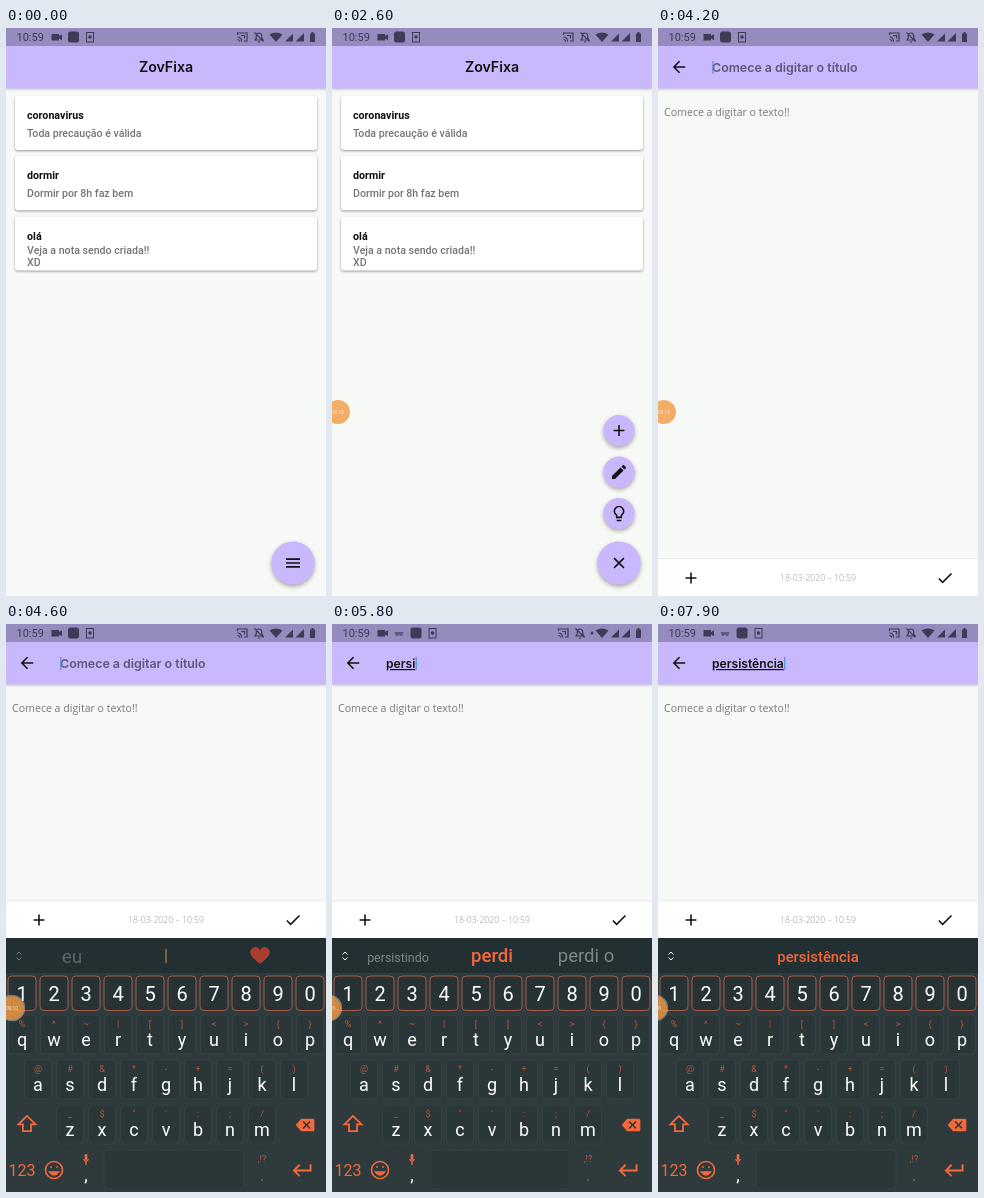
An HTML page that plays this animation: 320 px wide and 568 px high, repeating every 8000 ms.

```html
<!DOCTYPE html>
<html lang="pt">
<head>
<meta charset="utf-8">
<title>Notas</title>
<style>
html, body { margin: 0; height: 100%; overflow: hidden; background: #f7f9f7 }
svg { display: block; width: 100vw; height: 100vh; font-family: Roboto, sans-serif }
.card { fill: #fff; filter: drop-shadow(0 1px 1px #0006) }
.fab { filter: drop-shadow(0 2px 2px #0005) }
.bar { filter: drop-shadow(0 1px 1px #0003) }
.line { fill: none; stroke: currentColor; stroke-width: 2 }
.brand { font-family: Inter, sans-serif; font-weight: 600 }
.open { font-family: "Open Sans", sans-serif }
</style>
</head>
<body>
<svg id="stage" viewBox="0 0 320 568" preserveAspectRatio="none"></svg>
<script>
const LOOP = 8000, LILAC = '#c9b8fc', BG = '#f7f9f7', ORANGE = '#f4683c';
const $ = id => document.getElementById(id);

const text = (x, y, size, str, fill, more = '') =>
  `<text x="${x}" y="${y}" font-size="${size}" fill="${fill}" ${more}>${str}</text>`;
const mid = (x, y, size, str, fill, more = '') =>
  text(x, y, size, str, fill, 'text-anchor="middle" ' + more);
const rect = (x, y, w, h, fill, more = '') =>
  `<rect x="${x}" y="${y}" width="${w}" height="${h}" fill="${fill}" ${more}/>`;
const group = (id, body, more = '') => `<g id="${id}" ${more}>${body}</g>`;

// Icons live on a 24 unit grid
const ICONS = {
  menu: 'M3 7h18M3 12h18M3 17h18',
  close: 'M5.7 5.7l12.6 12.6M18.3 5.7L5.7 18.3',
  add: 'M5 12h14M12 5v14',
  back: 'M20 12H5.5M12.7 4.7L5.4 12l7.3 7.3',
  check: 'M4.1 12.7L9 17.6 20.3 6.3',
  bulb: 'M9 17v-2.8a6 6 0 1 1 6 0V17zM9 21h6',
  shift: 'M12 3L2.5 12.5H7.500V20h9v-7.500h5z',
  enter: 'M21 6v6.500H4M9.500 6.500L3.500 12.500l6 6',
  updown: 'M7 9l5-5 5 5M7 15l5 5 5-5',
  edit: 'M3 17.25V21h3.75L17.81 9.94l-3.75-3.75zM20.71 7.04c.39-.39.39-1.02 0-1.41l-2.34-2.34c-.39-.39-1.02-.39-1.41 0l-1.83 1.83 3.75 3.75z',
  erase: 'M22 4H7L0 12l7 8h15q2 0 2-2V6q0-2-2-2zM19 15.600L17.600 17 14 13.400 10.400 17 9 15.600 12.600 12 9 8.400 10.400 7 14 10.600 17.600 7 19 8.400 15.400 12z',
  heart: 'M12 21C3 14 1 11 1 7.500a5.700 5.700 0 0 1 11-2 5.700 5.700 0 0 1 11 2C23 11 21 14 12 21z',
};
const SOLID = ['edit', 'erase', 'heart'];
const icon = (name, x, y, color = '#111', k = .78) =>
  `<path d="${ICONS[name]}" transform="translate(${x} ${y}) scale(${k}) translate(-12 -12)" color="${color}" ` +
  (SOLID.includes(name) ? `fill="${color}"/>` : 'class="line"/>');

const appBar = body => `<rect class="bar" y="-10" width="320" height="70.500" fill="${LILAC}"/>` + body;

// Note list
const notes = [
  [68, 'coronavirus', ['Toda precaução é válida']],
  [128.2, 'dormir', ['Dormir por 8h faz bem']],
  [188.600, 'olá', ['Veja a nota sendo criada!!', 'XD']],
];
const card = ([y, title, lines]) =>
  `<rect class="card" x="9" y="${y}" width="302" height="54" rx="3"/>` +
  text(21, y + 23, 10.700, title, '#111', 'font-weight="600"') +
  lines.map((s, i) => text(21, y + 41 + (lines.length > 1 ? -4 + 12 * i : 0) + (lines.length > 1 ? 0 : 0), 10.600, s, '#757575', 'font-weight="500"')).join('');

const dial = ['add', 'edit', 'bulb'];
const dialY = [402.500, 444, 485.500];
const home = rect(0, 0, 320, 568, BG) +
  appBar(mid(160, 44, 14.200, 'ZovFixa', '#111', 'class="brand"')) +
  notes.map(card).join('') +
  dial.map((n, i) => group('dial' + i, `<circle class="fab" r="15.500" fill="${LILAC}"/>` + icon(n, 0, 0))).join('') +
  `<circle id="dialInk" cx="287" cy="${dialY[0]}" fill="#000"/>` +
  `<circle class="fab" cx="287" cy="535" r="21.600" fill="${LILAC}"/><circle id="fabInk" cx="287" cy="535" fill="#000"/>` +
  group('menu', icon('menu', 0, 0)) + group('close', icon('close', 0, 0));

// Editor
const editor = rect(0, 0, 320, 568, BG) +
  appBar(icon('back', 21, 39) +
    text(54, 44, 12.400, 'Comece a digitar o título', '#5f5779', 'id="hint" class="brand"') +
    text(54, 44, 12.100, '', '#111', 'id="typed" class="brand" text-decoration="underline"') +
    rect(54, 33, 1.200, 13, '#4f8fe0', 'id="caret"')) +
  text(6, 88, 10.600, 'Comece a digitar o texto!!', '#777', 'class="open"') +
  group('tools', rect(0, 531, 320, 37, '#fff', 'class="bar"') + rect(0, 530.500, 320, .7, '#e3e5e3') +
    icon('add', 33, 550) + icon('check', 287, 550) +
    mid(160, 553, 8.700, '18-03-2020 – 10:59', '#999', 'class="open" font-weight="300"'));

// Keyboard
const keys = {};
const row = (chars, hints, x0, top) => [...chars].map((c, i) => {
  const x = x0 + 32 * i;
  keys[c] = [x - 13.500, top];
  return rect(x - 13.500, top, 27, 39, '#2b3638', 'rx="4" stroke="#354143"') +
    mid(x, top + 12, 9, hints[i].replace('<', '&lt;'), '#b9593a') + mid(x, top + 31, 18, c, '#fff');
}).join('');

const board = rect(0, 314, 320, 254, '#2e3a3c') + rect(0, 314, 320, 35, '#223034') +
  [...'1234567890'].map((c, i) =>
    rect(2 + 32 * i, 352, 28, 34.500, '#273235', 'rx="4" stroke="#a65c44"') + mid(16 + 32 * i, 377, 20, c, '#fff')).join('') +
  row('qwertyuiop', '%^~|[]<>{}', 16, 391) +
  row('asdfghjkl', '@#&*-+=()', 32, 436) +
  row('zxcvbnm', `_$"':;/`, 64, 481) +
  rect(0, 0, 27, 39, '#fff', 'id="press" rx="4" opacity=".18"') +
  icon('shift', 21, 500, ORANGE, .9) + icon('erase', 299, 501, ORANGE) +
  mid(16, 551.500, 16, '123', ORANGE) +
  `<g fill="none" stroke="${ORANGE}" stroke-width="1.600"><circle cx="48" cy="546" r="8.500"/>
   <path d="M43.500 548q4.500 6 9 0z" fill="${ORANGE}"/><path d="M45 542v2M51 542v2M77.500 535q2.500 5 5 0M80 538v3" stroke-width="1.300"/></g>` +
  rect(78.700, 530, 2.600, 6, ORANGE, 'rx="1.300"') + mid(80, 557, 18, ',', '#fff') +
  rect(98, 526, 140, 39, '#2b3638', 'rx="4" stroke="#354143"') +
  mid(256, 538, 9, ',!?', '#b9593a') + mid(256, 557, 18, '.', '#8a5a4b') +
  icon('enter', 296, 546, ORANGE, .95) +
  group('updown', icon('updown', 13, 332, '#fff', .5)) +
  group('idle', mid(66, 339, 19, 'eu', '#6d787a') + rect(159.300, 325, 1.500, 14, '#c9883f') + icon('heart', 254, 332, '#d8452f', .88)) +
  [66, 160, 254].map((x, i) => mid(x, 338, 18, '', i == 1 ? ORANGE : '#7d8688', `id="word${i}"` + (i == 1 ? ' font-weight="500"' : ''))).join('');

// Status bar
const INK = '#3f3a55';
const status = rect(0, 0, 320, 18, '#958bbe') + text(10.500, 13, 11, '10:59', INK) +
  `<g fill="${INK}"><path d="M45.500 6h7.500v2l3-1.700v6L53 10.500v2h-7.500z"/>
   <path id="extra" d="M62.500 8h9l-1.500 4h-1.500l-1-1h-1l-1 1H64z" opacity=".6"/></g>` +
  group('left', rect(62, 3.500, 11, 11, INK, 'rx="2.500"') +
    `<rect x="80.500" y="4.500" width="7" height="9.500" fill="none" stroke="${INK}"/><circle cx="84" cy="9" r="1.800" fill="${INK}"/>`) +
  group('right', `<g fill="none" stroke="${INK}" stroke-width="1.200"><path d="M231.500 7V5h9.500v8h-3M231.500 9q4 0 4 4.500M231.500 11.500q2 0 2 2M235 7.500h3.500v3"/>
   <path d="M249 12h8l-1.300-2V7.500q-.5-2.500-2.700-2.500t-2.700 2.500V10zM248.500 4.500l9 9M252 14h2"/></g>`) +
  `<g fill="${INK}"><circle id="dot" cx="260" cy="9" r="1.500"/><path d="M263.500 6.500q6.500-4 13 0L270 14zM279 13.500h8v-8zM289.500 13.500h8.500v-8.500z"/>
   <path d="M304 5.500h1.500V4h2v1.500h1.500V14h-5z"/></g>`;

const bubble = `<circle r="13.300" fill="#fff" opacity=".35"/><circle r="12" fill="#ee8f2e" opacity=".72"/>` +
  mid(0, 1.800, 4.600, '00:10', '#fff', 'opacity=".8"');

$('stage').innerHTML = group('home', home) + group('editor', editor) + group('board', board) +
  status + group('bubble', bubble);

// Typing
const WORD = 'persidtencia', FIX = 'persistência', FIX_AT = 7500;
const strokes = [5000, 5200, 5400, 5550, 5700, 6050, 6250, 6450, 6600, 6750, 6900, 7100];
const offers = [
  ['para', 'por', 'pra'], ['pelo', 'pela', 'pessoa'], ['perto', 'per', 'pergunta'],
  ['perspectiva', 'pers', 'persiste'], ['persistindo', 'perdi', 'perdi o'],
  ['persistir', 'persiste', 'perdido'], ['persistir', 'persist', 'persistiu'],
  ['persistem', 'persiste', 'persistente'], ['persistente', 'persistent', 'persistem'],
  ['persistência', 'persistence', 'persistent'], ['persistência', 'persistence', 'persistent'],
  ['persistente', FIX, 'persistências'],
];

const clamp = v => Math.max(0, Math.min(1, v));
const ramp = (t, a, b) => clamp((t - a) / (b - a));
const ease = p => 1 - (1 - p) ** 3;
const set = (id, attrs) => { for (const k in attrs) $(id).setAttribute(k, attrs[k]); };
const show = (id, on) => set(id, { visibility: on ? 'inherit' : 'hidden' });
const ink = (id, t, a, b, r) => {
  const p = ramp(t, a, b);
  set(id, { r: r * ease(p), opacity: p < 1 ? .15 * (1 - p) : 0 });
};

function drawHome(t) {
  dialY.forEach((y, i) => {
    const start = 2300 - 150 * i;
    set('dial' + i, { transform: `translate(287 ${y}) scale(${ease(ramp(t, start, start + 290))})` });
  });
  const turn = ramp(t, 2000, 2580);
  set('menu', { transform: `translate(287 535) rotate(${180 * turn})` });
  set('close', { transform: `translate(287 535) rotate(${180 * turn - 180})` });
  show('menu', turn < .5);
  show('close', turn >= .5);
  ink('fabInk', t, 1700, 2300, 21.600);
  ink('dialInk', t, 2800, 3200, 15.500);
}

function drawEditor(t) {
  const n = strokes.filter(s => s <= t).length, fixed = t >= FIX_AT, open = t >= 4600;
  const enter = ramp(t, 3000, 3400);
  show('editor', enter > 0);
  set('editor', { opacity: enter, transform: `translate(0 ${142 * (1 - ease(enter))})` });
  set('tools', { transform: `translate(0 ${open ? -254 : 0})` });
  $('typed').textContent = fixed ? FIX : WORD.slice(0, n);
  show('hint', !n);
  show('caret', t >= 4100);
  set('caret', { x: 54.300 + (n ? $('typed').getComputedTextLength() : 0) });

  show('board', open);
  show('idle', !n);
  set('updown', { opacity: n ? 1 : .35 });
  set('idle', { opacity: .75 + .25 * ramp(t, 4600, 4900) });
  const words = fixed ? ['', FIX, ''] : n ? offers[n - 1] : ['', '', ''];
  words.forEach((w, i) => {
    $('word' + i).textContent = w;
    set('word' + i, { 'font-size': Math.min(18.500, (i == 1 ? 178 : 137) / (w.length || 1)) });
  });
  const next = strokes[n], down = next && next - t < 120;
  show('press', down);
  if (down) set('press', { x: keys[WORD[n]][0], y: keys[WORD[n]][1] });
}

function frame() {
  const t = performance.now() % LOOP;
  drawHome(t);
  drawEditor(t);

  const extra = t >= 5400, dot = t >= 5500 && t < 6400;
  show('extra', extra);
  set('left', { transform: `translate(${extra ? 16.500 : 0} 0)` });
  show('dot', dot);
  set('right', { transform: `translate(${dot ? -5 : 0} 0)` });

  const x = -15 + 33 * ease(ramp(t, 100, 800)) - 12 * ramp(t, 1150, 1300) - 9 * ramp(t, 4650, 4900);
  set('bubble', { transform: `translate(${x} 384)` });
  requestAnimationFrame(frame);
}
frame();
</script>
</body>
</html>
```
